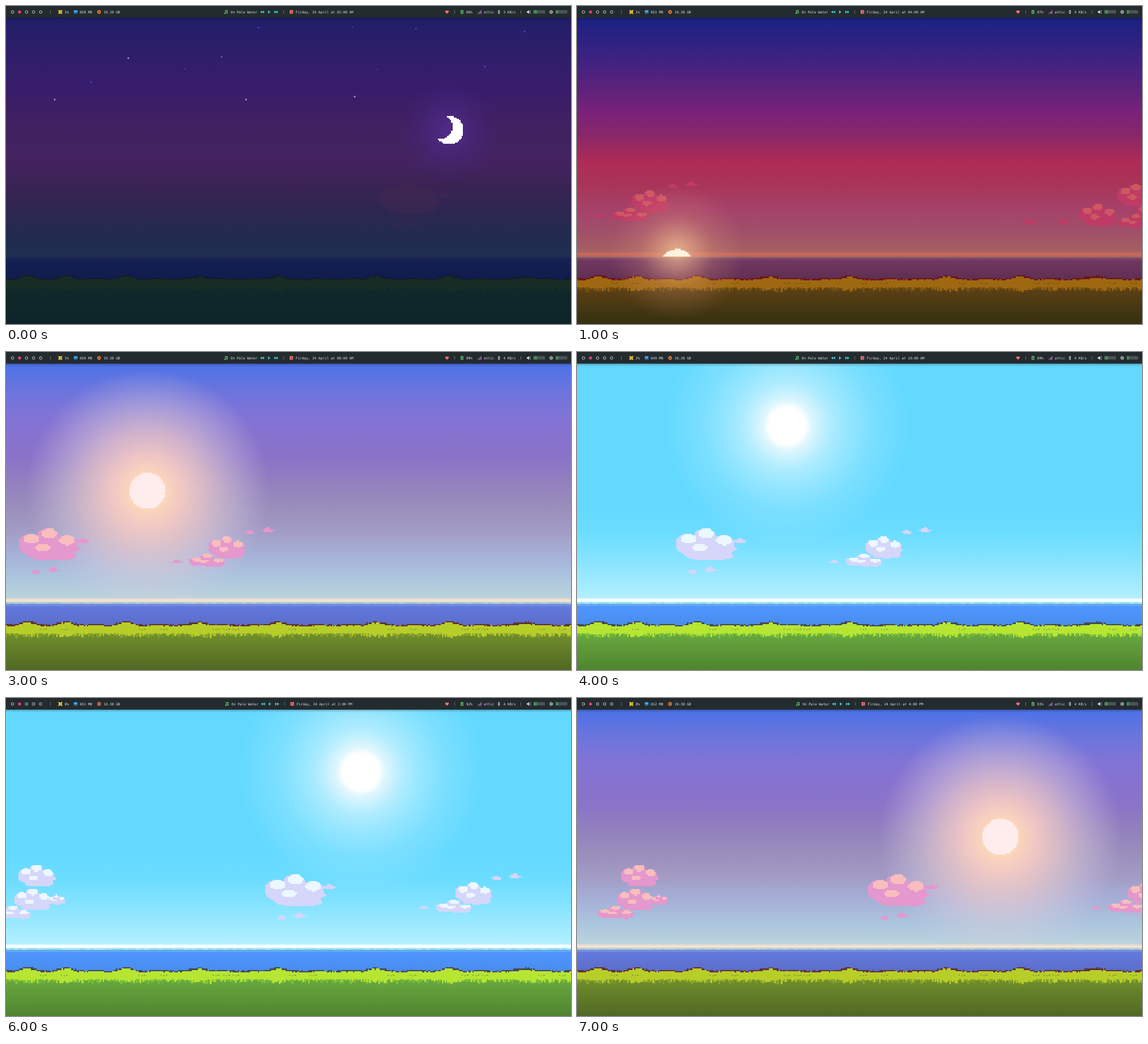
These frames come from a looping animation (998 px wide and 561 px high, 8000 ms). An HTML page:

```html
<!DOCTYPE html>
<html lang="en">
<head>
<meta charset="utf-8">
<title>Pixel lakeside desktop</title>
<style>
html, body { margin: 0; width: 100%; height: 100%; overflow: hidden; background: #232b2f; }
svg { display: block; width: 998px; height: 561px; }
text { font: 6.05px "DejaVu Sans Mono", "Noto Sans Mono", monospace; fill: #dde3e6; white-space: pre; }
.px { shape-rendering: crispEdges; }
</style>
</head>
<body>
<svg id="stage" viewBox="0 0 998 561" xmlns="http://www.w3.org/2000/svg"></svg>
<script>
const W = 998, U = 2.34, HORIZON = 442;
const stage = document.getElementById('stage');

function seeded(s) {
  return () => (s = (s * 16807) % 2147483647) / 2147483647;
}
const rect = (x, y, w, h, fill, more = '') =>
  `<rect x="${x}" y="${y}" width="${w}" height="${h}" fill="${fill}" ${more}/>`;
const path = (d, fill, more = '') => `<path d="${d}" fill="${fill}" ${more}/>`;
const snap = v => Math.round(v / U) * U;

// Turns a shape test into rows of square cells.
function pixels(x0, y0, x1, y1, inside) {
  let d = '';
  for (let y = snap(y0); y < y1; y += U) {
    let from = null;
    for (let x = snap(x0); x <= x1 + U; x += U) {
      const on = x <= x1 && inside(x + U / 2, y + U / 2);
      if (on && from === null) from = x;
      if (!on && from !== null) {
        d += `M${from.toFixed(2)} ${y.toFixed(2)}H${x.toFixed(2)}v${U}H${from.toFixed(2)}z`;
        from = null;
      }
    }
  }
  return d;
}
function ovals(list) {
  const min = (i, r) => Math.min(...list.map(e => e[i] - e[r]));
  const max = (i, r) => Math.max(...list.map(e => e[i] + e[r]));
  return pixels(min(0, 2), min(1, 3), max(0, 2), max(1, 3), (x, y) =>
    list.some(([a, b, p, q]) => ((x - a) / p) ** 2 + ((y - b) / q) ** 2 < 1));
}
const disc = (cx, cy, r, end = 600) => pixels(cx - r, cy - r, cx + r, Math.min(cy + r, end),
  (x, y) => Math.hypot(x - cx, y - cy) < r);

// A heap of three lumps on a flat skirt; each lump is lit from above.
function heap(left, top, w, h, slope = .7) {
  const at = (x, y, rx, ry) => [left + w * x, top + h * y, w * rx, h * ry];
  const body = [at(.48, .63, .46, .27), at(.56, .86, .4, .14), at(.83, .64, .18, .1)];
  const light = [at(.4, .6, .13, .11)];
  for (const t of [.19, .48, .78]) {
    const peak = Math.abs(t - .45) * slope;
    body.push(at(t, peak + .32, .2, .32));
    light.push(at(t + .02, peak + .15, .13, .15));
  }
  return { body, light };
}
const wisp = (x, y, k) => ({ body: [[x, y, 12 * k, 2.6 * k], [x, y - 2 * k, 6 * k, 3.4 * k]], light: [] });
const sprite = (...parts) => ({
  body: ovals(parts.flatMap(p => p.body)),
  light: ovals(parts.flatMap(p => p.light))
});
const puff = (x, y) => heap(x, y, 65, 40);
const low = (x, y) => heap(x, y, 65, 23, 1.2);
const clouds = {
  A: sprite(puff(0, 324), low(-35, 355), wisp(-56, 371, .8), wisp(72, 318, .8), wisp(105, 315, 1)),
  B: sprite(heap(0, 310, 106, 58), wisp(113, 334, 1), wisp(29, 388, .8), wisp(60, 385, 1)),
  C: sprite(puff(0, 293), puff(-7, 335), heap(50, 347, 33, 17), low(-42, 366)),
  D: sprite(puff(0, 348), puff(67, 313), puff(100, 345), low(67, 367), wisp(-88, 381, 1), wisp(-28, 381, .8))
};

// The shore repeats its three hills.
const PERIOD = 441;
const hills = [108];
for (let x = 210 - PERIOD; x < W; x += PERIOD) hills.push(x, x + 133, x + 266);

function steps(height, bottom) {
  let d = `M0 ${bottom}`;
  for (let x = 0; x < W; x += U) d += `V${snap(height(x)).toFixed(2)}H${(x + U).toFixed(2)}`;
  return d + `V${bottom}z`;
}
function shore() {
  const rnd = seeded(77);
  const lift = x => Math.max(...hills.map(h => Math.max(0, 5.5 - Math.abs(x - h) / 4.5)));
  const crest = x => 480.5 - lift(x) + Math.sin(x / 9) * .9 + (rnd() - .5) * 2;
  const tufts = x => 495.5 + lift(x) * .5 + rnd() * rnd() * 9;
  return {
    edge: steps(crest, 486),
    band: steps(x => crest(x) + 2.6, 494),
    blades: steps(tufts, 492),
    shade: steps(x => tufts(x) + 2, 492)
  };
}
const land = shore();

let flowers = '';
for (let base = 0; base < W; base += 440)
  for (const x of [60, 97, 234, 273, 365, 384, 400])
    for (let i = 0; i < 3; i++) flowers += `M${base + x + i * 4.7} ${487.5 + i % 2}h2.3v2.3h-2.3z`;

let foam = '';
const foamRnd = seeded(31);
for (let x = 3; x < W; x += 9 + foamRnd() * 24) foam += `M${x.toFixed(1)} 442.5h${(3 + foamRnd() * 9).toFixed(1)}v1.6H${x.toFixed(1)}z`;

// Sky colours are evenly spaced from the bar to the horizon.
const night = {
  sky: '211e68 2a1e69 321e6a 381c6b 3e1f62 412260 442260 3a2354 2f2651 232a50 1e2e4e',
  glint: '#1e2e4e', foam: '#1f2b54', water: ['#152052', '#0f1c4c'], edge: '#151b2b', band: '#182c26', shade: '#13292a',
  field: ['#10282a', '#0e2429'], flower: '#182c26', cloud: ['#81304f', '#81304f']
};
const dawn = {
  sky: '1a2282 2e2282 452280 5e227a 7a227a 8a2868 ae2b56 a93557 a6416a a05068 a66460',
  glint: '#c8685a', foam: '#a0646a', water: ['#703862', '#602e50'], edge: '#6e141e', band: '#9e6810', shade: '#765012',
  field: ['#5e4014', '#343010'], flower: '#7c5214', cloud: ['#c03a66', '#cc5862']
};
const sunrise = {
  sky: '222ae6 442cde 6a2ad8 862bd2 9e2ccc b72fa8 d03a86 d24280 cf5faa ce85a2 d6a09c',
  glint: '#f8b48c', foam: '#d8a89a', water: ['#925496', '#8c4678'], edge: '#961428', band: '#d4aa10', shade: '#a88812',
  field: ['#9e6818', '#585c16'], flower: '#a87c1c', cloud: ['#e250aa', '#fa708c']
};
const day = {
  sky: '64d9ff 64d9ff 64d9ff 64d9ff 64d9ff 64d9ff 64d9ff 6adcff 80e2ff 9ce9ff b6f0ff',
  glint: '#ffffff', foam: '#9ae4e4', water: ['#5096ff', '#488ceb'], edge: '#484854', band: '#b6e632', shade: '#7cc03a',
  field: ['#68a83e', '#508430'], flower: '#84b03c', cloud: ['#d6d6fa', '#ecf8ff']
};
const soft = {
  sky: '4c72e8 6874de 7e74d7 8772cf 8a74c8 9280be 9a8ebc a29cc4 a6b0d8 acc6de bed6dc',
  glint: '#fae1cd', foam: '#a8ccd4', water: ['#627ade', '#5c6cc8'], edge: '#603232', band: '#b8ce28', shade: '#88a42c',
  field: ['#708e2c', '#506824'], flower: '#8c9c30', cloud: ['#e498cd', '#f8bebe']
};
// Glow: radius, then "offset colour opacity".
const dayGlow = [215, '.15 #fff 1,.2 #fbfdfd .82,.35 #f0fcff .55,.48 #e8fbff .4,.7 #e0faff .18,1 #e0faff 0'];
const softGlow = [215, '.15 #ffd8bc .97,.3 #fbcfc4 .88,.5 #eccbcc .7,.75 #dccddc .36,1 #d4c8e0 0'];
const lowGlow = [120, '0 #ffd09a .72,.28 #fcc090 .45,.55 #f0a884 .2,1 #e89c80 0'];
const moonGlow = [92, '0 #58309a .7,.35 #502c90 .5,.7 #482888 .22,1 #442480 0'];

// One scene every two hours.
const scenes = [
  { p: night, cpu: 1, mem: 658, bat: 86, orb: [783, 219], glow: moonGlow, clouds: { B: 660 }, haze: .1, stars: 13 },
  { p: dawn, cpu: 1, mem: 651, bat: 87, orb: [177, 461], glow: lowGlow, sun: '#fff2de', clouds: { A: 97, D: 888 }, stars: 8 },
  { p: sunrise, cpu: 0, mem: 653, bat: 88, orb: [177, 445], glow: lowGlow, sun: '#fff4de', clouds: { A: 205 }, mirror: true },
  { p: soft, cpu: 1, mem: 650, bat: 89, orb: [250, 245], glow: softGlow, sun: '#ffecec', clouds: { A: 358, B: 23 } },
  { p: day, cpu: 2, mem: 649, bat: 89, orb: [371, 130], glow: dayGlow, sun: '#fff', clouds: { A: 510, B: 175 } },
  { p: day, cpu: 1, mem: 650, bat: 91, orb: [499, 130], glow: dayGlow, sun: '#fff', clouds: { A: 652, B: 317 } },
  { p: day, cpu: 0, mem: 651, bat: 92, orb: [627, 130], glow: dayGlow, sun: '#fff', clouds: { A: 794, B: 458, C: 22 } },
  { p: soft, cpu: 0, mem: 652, bat: 93, orb: [748, 245], glow: softGlow, sun: '#ffecec', clouds: { A: 973, B: 514, C: 78 } }
];
function clock(step) {
  const h = 2 + step * 2;
  if (h < 12) return String(h).padStart(2, '0') + ':00 AM';
  return (h > 12 ? h - 12 : h) + ':00 PM';
}

// Blue stars first, then white ones.
const stars = '446,38 612,37 724,40 916,45 150,134 654,112 846,107 316,111 216,92 381,90 86,165 424,165 616,160';
function drawStars(count) {
  const faint = count < 13;
  return stars.split(' ').slice(0, count).map((s, i) => {
    const [x, y] = s.split(',').map(Number);
    const size = i % 4 === 1 || i === 7 ? 1.8 : 2.6;
    return rect(x - size / 2, y - size / 2 - (faint ? 3 : 0), size, size, i < 8 ? '#5444dc' : '#b4a4d0', `opacity="${faint ? .25 : 1}"`);
  }).join('');
}

const moon = pixels(756, 193, 809, 245, (x, y) =>
  Math.hypot(x - 783, y - 219) < 25.2 && Math.hypot(x - 768, y - 213) > 21);

const stop = (o, c, a = 1) => `<stop offset="${o}" stop-color="${c}" stop-opacity="${a}"/>`;
const linear = (id, y0, y1, list) =>
  `<linearGradient id="${id}" gradientUnits="userSpaceOnUse" x1="0" x2="0" y1="${y0}" y2="${y1}">` +
  list.map(s => stop(...s)).join('') + '</linearGradient>';

function defs({ p, orb, glow, sun }) {
  const sky = p.sky.split(' ').map((c, i) => [i / 10, '#' + c]);
  const halo = glow[1].split(',').map(s => stop(...s.split(' '))).join('');
  return '<defs>' + linear('sky', 21, 441, sky) +
    linear('water', 448, 483, [[0, p.water[0]], [1, p.water[1]]]) +
    linear('field', 497, 561, [[0, p.field[0]], [1, p.field[1]]]) +
    linear('glint', 433, 441, [[0, p.glint, 0], [.55, p.glint, sun ? 1 : .3], [1, p.glint, .75]]) +
    linear('drop', 20, 26, [[0, '#000', .22], [1, '#000', 0]]) +
    `<radialGradient id="halo" gradientUnits="userSpaceOnUse" cx="${orb[0]}" cy="${Math.min(orb[1], 434)}" r="${glow[0]}">${halo}</radialGradient></defs>`;
}

function reflection() {
  let near = '', far = '';
  for (let i = 0; i < 8; i++) {
    const row = (w, h) => `M${177 - w} ${444 + i * U}h${w * 2}v${h}h${-w * 2}z`;
    near += row(64 * Math.sqrt(1 - (i / 8.6) ** 2) + 3 * Math.sin(i * 2.5), U);
    far += row(120 - i * 7 + 6 * Math.sin(i * 3), 1.5);
  }
  return path(far, '#c0609c', 'opacity=".5"') + path(near, '#dcaa8c', 'opacity=".85"');
}

function landscape(s) {
  const { p, orb } = s, rising = orb[1] > 400;
  let out = rect(0, 0, W, 442, 'url(#sky)');
  if (s.stars) out += drawStars(s.stars);
  if (!rising) out += rect(0, 21, W, 420, 'url(#halo)');
  out += '<g class="px">';
  for (const [k, x] of Object.entries(s.clouds))
    out += `<g transform="translate(${x})" opacity="${s.haze || 1}">` +
      path(clouds[k].body, p.cloud[0]) + path(clouds[k].light, p.cloud[1]) + '</g>';
  out += '</g>' + rect(0, 433, W, 8, 'url(#glint)') +
    rect(0, 441, W, 3, p.foam) + rect(0, 444, W, 45, 'url(#water)') +
    rect(0, 444, W, 4, p.foam, 'opacity=".25"') + path(foam, p.glint, 'opacity=".5"');
  if (s.mirror) out += reflection();
  out += '<g class="px">' + path(land.edge, p.edge) + rect(0, 492, W, 69, 'url(#field)') + path(land.shade, p.shade) +
    path(land.band, p.band) + path(land.blades, p.band) + path(flowers, p.flower) + '</g>';
  if (rising) out += rect(0, 310, W, 250, 'url(#halo)');
  out += path(s.sun ? disc(...orb, 32, HORIZON - 1) : moon, s.sun || '#fff', 'class="px"');
  return out + rect(0, 20, W, 6, 'url(#drop)');
}

const label = (x, t) => `<text x="${x}" y="12.8">${t}</text>`;
const divider = x => rect(x - .4, 7.5, .8, 6, '#7d878b');
function meter(x, lit) {
  let out = '';
  for (let i = 0; i < 10; i++) out += rect((x + i * 2.03).toFixed(2), 7.3, 1.2, 6, i < lit ? '#62d26a' : '#657076');
  return out;
}

function bar(s, step) {
  const cyan = '#4dd0e1', pale = '#dde3e6', pink = '#ec407a', time = clock(step);
  let out = rect(0, 0, W, 20.6, '#232b2f');
  for (let i = 0; i < 5; i++)
    out += `<circle cx="${11.5 + i * 12.4}" cy="10.6" r="2.3" fill="${i === 1 ? pink : 'none'}" stroke="${i === 1 ? pink : pale}" stroke-width=".9"/>`;
  out += [78.5, 792.5, 909.5].map(divider).join('');
  // processor, memory and disk
  out += rect(93.2, 7.8, 5.4, 5.4, '#fdd835') + path('M92.5 7h1.5v1.2h-1.5zM98 7h1.5v1.2h-1.5zM92.5 12.8h1.5v1.2h-1.5zM98 12.8h1.5v1.2h-1.5z', '#fdd835') +
    rect(95, 9.6, 1.8, 1.8, '#6c621f') + label(103.6, s.cpu + '%');
  out += path('M119.8 7.6h6.4v4h-6.4zM120.2 12.1h1.2v1.4h-1.2zM122.4 12.1h1.2v1.4h-1.2zM124.6 12.1h1.2v1.4h-1.2z', '#42a5f5') + label(130.2, s.mem + ' MB');
  out += '<circle cx="164.4" cy="10.5" r="2.2" fill="none" stroke="#f4803c" stroke-width="1.9"/>' + label(172.4, '19.38 GB');
  // player and date, centred as one group
  out += `<g transform="translate(${time.length < 8 ? 1.5 : 0})">` +
    path('M387 7.5h4.5v4.6a1.3 1.2 0 1 1-1-1.2V9H388v4a1.2 1.1 0 1 1-1-1.1z', '#62d26a') + label(396.8, 'On Pale Water') +
    path('M452.3 8v5.2l-3.3-2.6zM455.8 8v5.2l-3.3-2.6zM463 7.8v5.6l3.8-2.8zM474 8v5.2l3.3-2.6zM477.5 8v5.2l3.3-2.6z', cyan) +
    divider(490.5) + rect(501, 7.3, 6.2, 6.2, '#f4716f', 'rx=".6"') + path('M503.7 8.7h.9v1.8h1.7v.9h-2.6z', '#3a3034') +
    label(511.8, 'Firday, 24 April at ' + time) + '</g>';
  // status icons
  out += path('M779 13.7l-2.9-2.9a1.6 1.6 0 0 1 2.9-2.1a1.6 1.6 0 0 1 2.9 2.1z', '#f4716f');
  out += path('M804.4 6.9h2v.9h1.4v6h-4.8v-6h1.4z', '#62d26a') + path('M804 8.8h2.8v4h-2.8z', '#294033') +
    path('M805.8 9l-1.5 2h1l-.4 1.6l1.5-2h-1z', '#8cf094') + label(813, s.bat + '%');
  for (let i = 0; i < 4; i++) out += rect(833.3 + i * 1.8, 12 - i * 1.5, 1.2, 1.7 + i * 1.5, '#ba68c8');
  out += label(844, 'attic') + path('M870.7 7l2.3 2.8h-4.6zM870.7 14l2.3-2.8h-4.6z', pale) + label(878.6, (step ? 4 : 3) + ' KB/s');
  out += path('M920 9.3h1.6l2.4-2v6.4l-2.4-2H920zM925 8h2v.7h-2zM925 10.2h1.5v.7H925zM925 12.3h2v.7h-2z', pale) + meter(932.2, 3);
  out += '<circle cx="963" cy="10.5" r="2.7" fill="none" stroke="#dde3e6" stroke-width="1.2" stroke-dasharray="1.2 .9"/>' +
    '<circle cx="963" cy="10.5" r="1.5" fill="none" stroke="#dde3e6" stroke-width="1"/>' + meter(971.5, 2);
  return out;
}

let shown = -1;
function draw(ms) {
  const step = Math.floor(ms / 1000) % scenes.length;
  if (step === shown) return;
  shown = step;
  const s = scenes[step];
  stage.innerHTML = defs(s) + landscape(s) + bar(s, step);
}
const start = performance.now();
function tick() {
  draw(performance.now() - start);
  requestAnimationFrame(tick);
}
tick();
</script>
</body>
</html>
```
